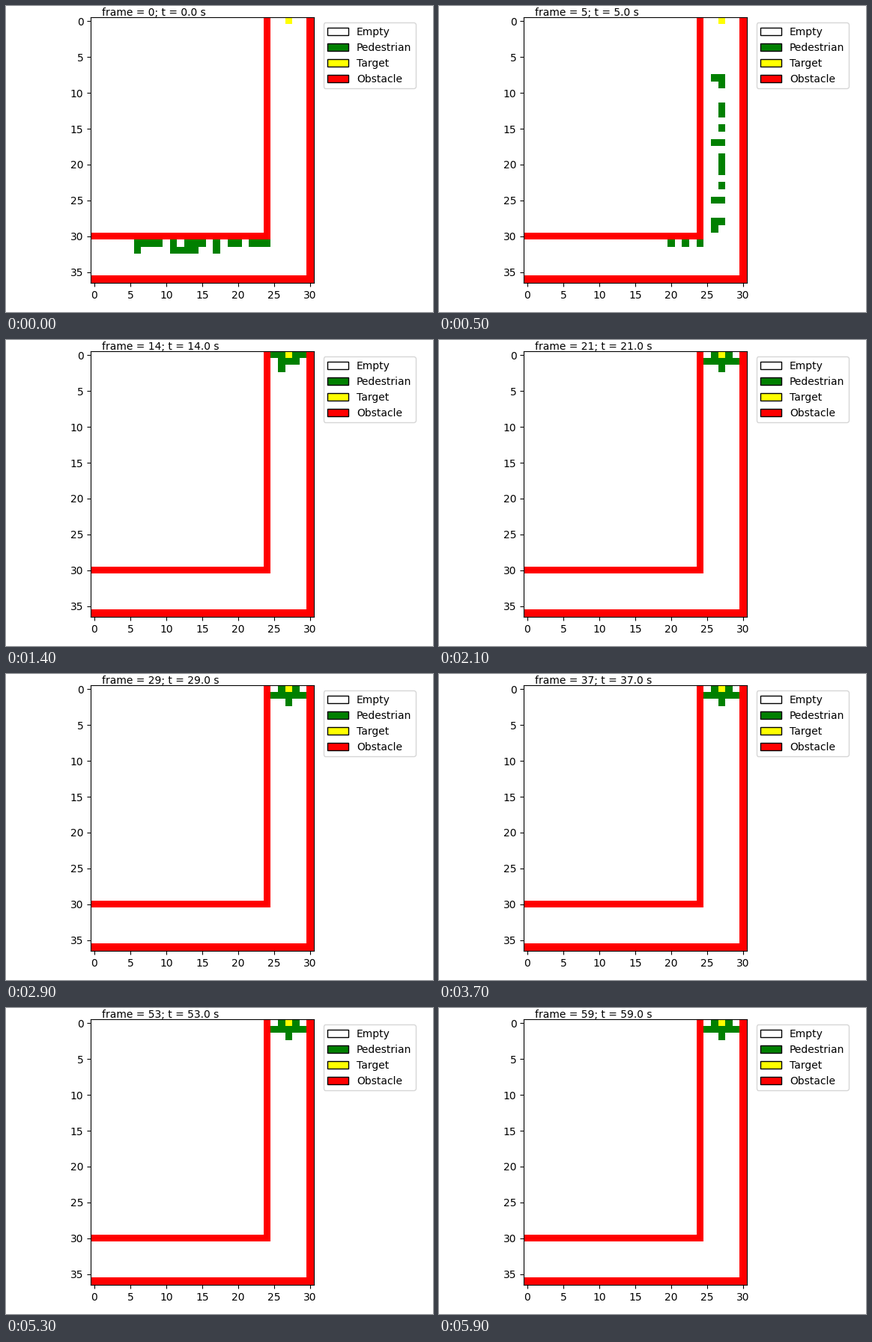
A matplotlib script for the animation above (6000 ms loop, 570 px wide and 409 px high).

```python
import numpy as np
import matplotlib.pyplot as plt
from matplotlib.animation import FuncAnimation
from matplotlib.colors import ListedColormap
from matplotlib.patches import Patch

W, H, DPI = 570, 409, 100
COLS, ROWS = 31, 37
CELL, LEFT, TOP = 9.595, 113.2, 15.3
STEPS, SPEED, JAM_SPEED = 60, 5, 2
EMPTY, PED, EXIT, WALL = range(4)
LABELS = ["Empty", "Pedestrian", "Target", "Obstacle"]
COLORS = ["white", "green", "yellow", "red"]

plt.rcParams["font.family"] = "DejaVu Sans"

# Starting cells as (column, row)
START = [(c, 31) for c in (6, 7, 8, 9, 11, 13, 14, 15, 17, 19, 20, 22, 23, 24)]
START += [(c, 32) for c in (6, 11, 12, 13, 14, 17)]

# Distance along the route, zero at the inner corner: at the start and at 5 s
S0 = sorted((c - 24 for c, _ in START), reverse=True)
S5 = [23, 23, 22, 19, 18, 16, 14, 14, 12, 11, 10, 8, 6, 6, 3, 3, 2, 0, -2, -4]
GOAL = 31

# Places taken around the exit, alternating every step
INNER = [(26, 0), (28, 0), (27, 1), (26, 1), (28, 1)]
CROWD = [INNER + [(25, 0), (29, 0), (26, 2)],
         INNER + [(25, 1), (29, 1), (27, 2)]]


def distance(s0, s5, t):
    free = s5 + SPEED * (t - 5)
    if t > 5:
        return free - (s5 <= 0)  # late walkers lose a cell at the corner
    return max(s0 + JAM_SPEED * t, free)


def place(s, lane):
    if s <= 0:
        return 24 + s, 31 + lane
    if s < 3:
        return 24 + s, 31 - s + lane
    return 27 - lane, 31 - s


def pedestrians(t):
    if t == 0:
        return set(START)
    walk = [distance(a, b, t) for a, b in zip(S0, S5)]
    arrived = sum(s >= GOAL for s in walk)
    cells = set(CROWD[t % 2][:arrived])
    for s in walk:
        if s < GOAL:
            options = [place(s, lane) for lane in range(3)]
            cells.add(next((p for p in options if p not in cells), options[0]))
    return cells


def grid(t):
    g = np.full((ROWS, COLS), EMPTY)
    for c, r in pedestrians(t):
        g[r, c] = PED
    g[0, 27] = EXIT
    g[:31, 24] = g[30, :25] = WALL
    g[:, 30] = g[36, :] = WALL
    return g


fig = plt.figure(figsize=(W / DPI, H / DPI), dpi=DPI, facecolor="white")
w, h = COLS * CELL, ROWS * CELL
ax = fig.add_axes([LEFT / W, 1 - (TOP + h) / H, w / W, h / H])
image = ax.imshow(grid(0), cmap=ListedColormap(COLORS), vmin=0, vmax=3,
                  interpolation="nearest", aspect="auto")
ax.set_xticks(range(0, 31, 5))
ax.set_yticks(range(0, 36, 5))
caption = ax.text(1, -0.74, "")
ax.legend(handles=[Patch(facecolor=c, edgecolor="black", label=n)
                   for c, n in zip(COLORS, LABELS)],
          loc="upper left", bbox_to_anchor=(1.02, 1))


def update(t):
    image.set_data(grid(t))
    caption.set_text(f"frame = {t}; t = {t:.1f} s")
    return image, caption


anim = FuncAnimation(fig, update, frames=STEPS, interval=100, repeat=True)
plt.show()
```
